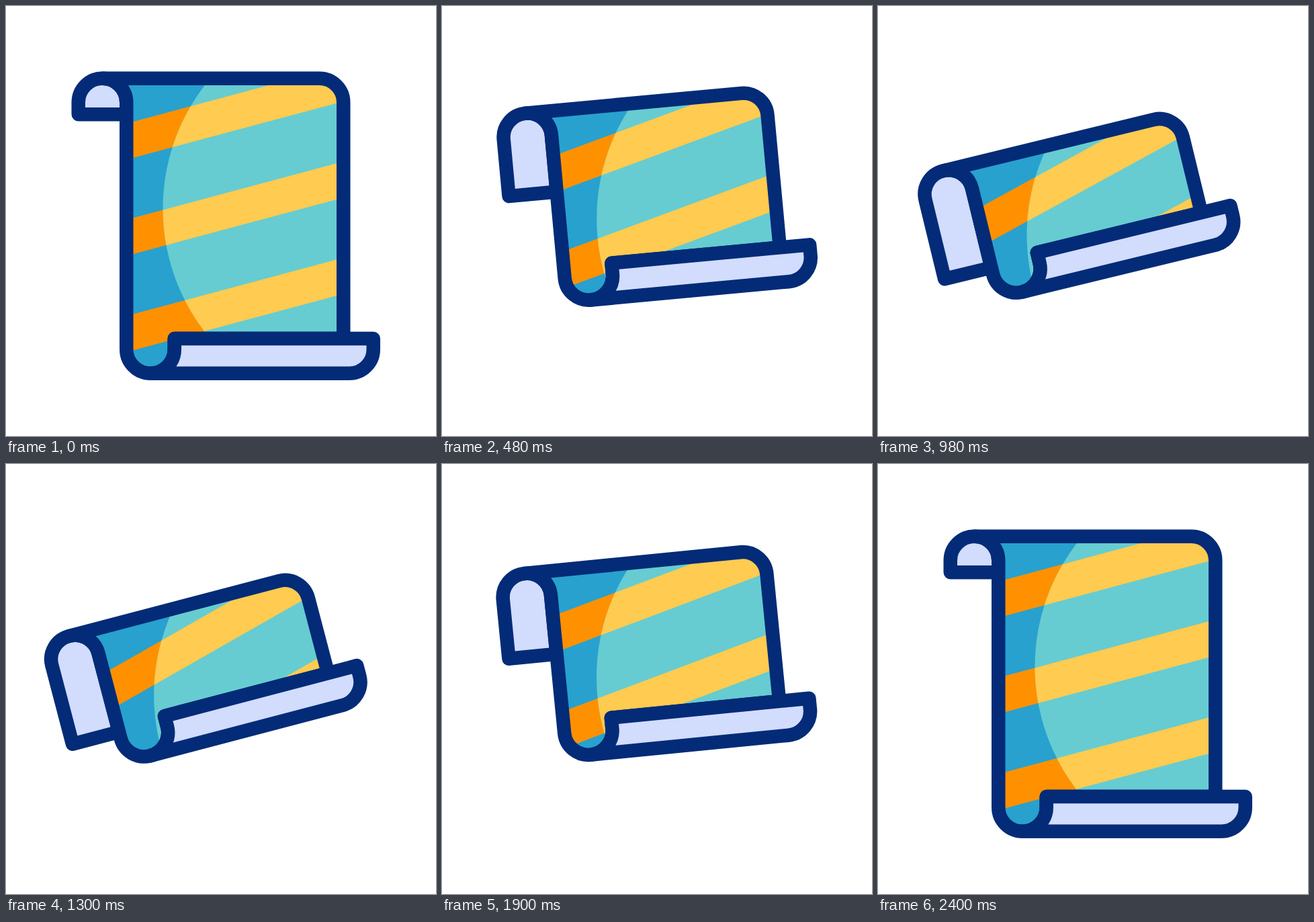
Write an HTML page that moves like this. It is 640x640 px and loops after 2420 ms.

```html
<!DOCTYPE html>
<html lang="en">
<head>
<meta charset="utf-8">
<title>Paper scroll</title>
<style>
  html, body { margin: 0; height: 100%; overflow: hidden; background: #fff; }
  svg { display: block; width: 100vw; height: 100vh; }
  .line { stroke: #032b77; stroke-width: 20.5; stroke-linejoin: round; }
</style>
</head>
<body>
<svg viewBox="0 0 640 640">
  <defs>
    <path id="sheet"/>
    <clipPath id="paper"><use href="#sheet"/></clipPath>
    <clipPath id="disc"><circle cx="534.5" cy="301.5" r="301"/></clipPath>
    <path id="stripes" d="M169.5 177.4l343-91.9v53.8l-343 91.9z m0 143.25l343-91.9v53.8l-343 91.9z m0 143.25l343-91.9v53.8l-343 91.9z"/>
  </defs>
  <g id="scroll">
    <path id="flap" class="line" fill="#d2dcfd"/>
    <g clip-path="url(#paper)">
      <path fill="#28a1ce" d="M100 90h420v470H100z"/>
      <use href="#stripes" fill="#ff9100"/>
      <g clip-path="url(#disc)">
        <path fill="#66ccd1" d="M100 90h420v470H100z"/>
        <use href="#stripes" fill="#ffcb50"/>
      </g>
    </g>
    <use href="#sheet" class="line" fill="none"/>
    <path id="tray" class="line" fill="#d2dcfd"
      d="M250.75 495H546.75V511a35.75 35.75 0 0 1-35.75 35.75H215A35.75 35.75 0 0 0 250.75 511z"/>
  </g>
</svg>
<script>
const LOOP = 2420, HALF = 1200, ROLL = 800;
const CENTER = 327.3;
const el = id => document.getElementById(id);
const [scroll, flap, sheet, tray] = ['scroll', 'flap', 'sheet', 'tray'].map(el);

function ease(x) {
  x = Math.min(x, 1);
  return x * x * (3 - 2 * x);
}

function draw(now) {
  const t = Math.min(now % LOOP, 2 * HALF);
  const phase = Math.min(t, 2 * HALF - t);
  const tilt = ease(phase / HALF);
  const roll = ease(phase / ROLL);
  const lift = 236 * roll;
  const curl = 511 - lift;

  scroll.setAttribute('transform',
    `translate(0 ${96.4 * tilt}) rotate(${-15 * tilt} ${CENTER} ${CENTER})`);
  flap.setAttribute('d',
    `M179.25 ${161.2 + 103.4 * roll}H107.75V143.5a35.75 35.75 0 0 1 71.5 0z`);
  sheet.setAttribute('d',
    `M143.5 107.75H466.5a35.75 35.75 0 0 1 35.75 35.75V${495 - lift}H250.75V${curl}` +
    `a35.75 35.75 0 0 1-71.5 0V143.5a35.75 35.75 0 0 0-35.75-35.75z`);
  tray.setAttribute('transform', `translate(0 ${-lift})`);
  requestAnimationFrame(() => draw(performance.now()));
}
draw(performance.now());
</script>
</body>
</html>
```
